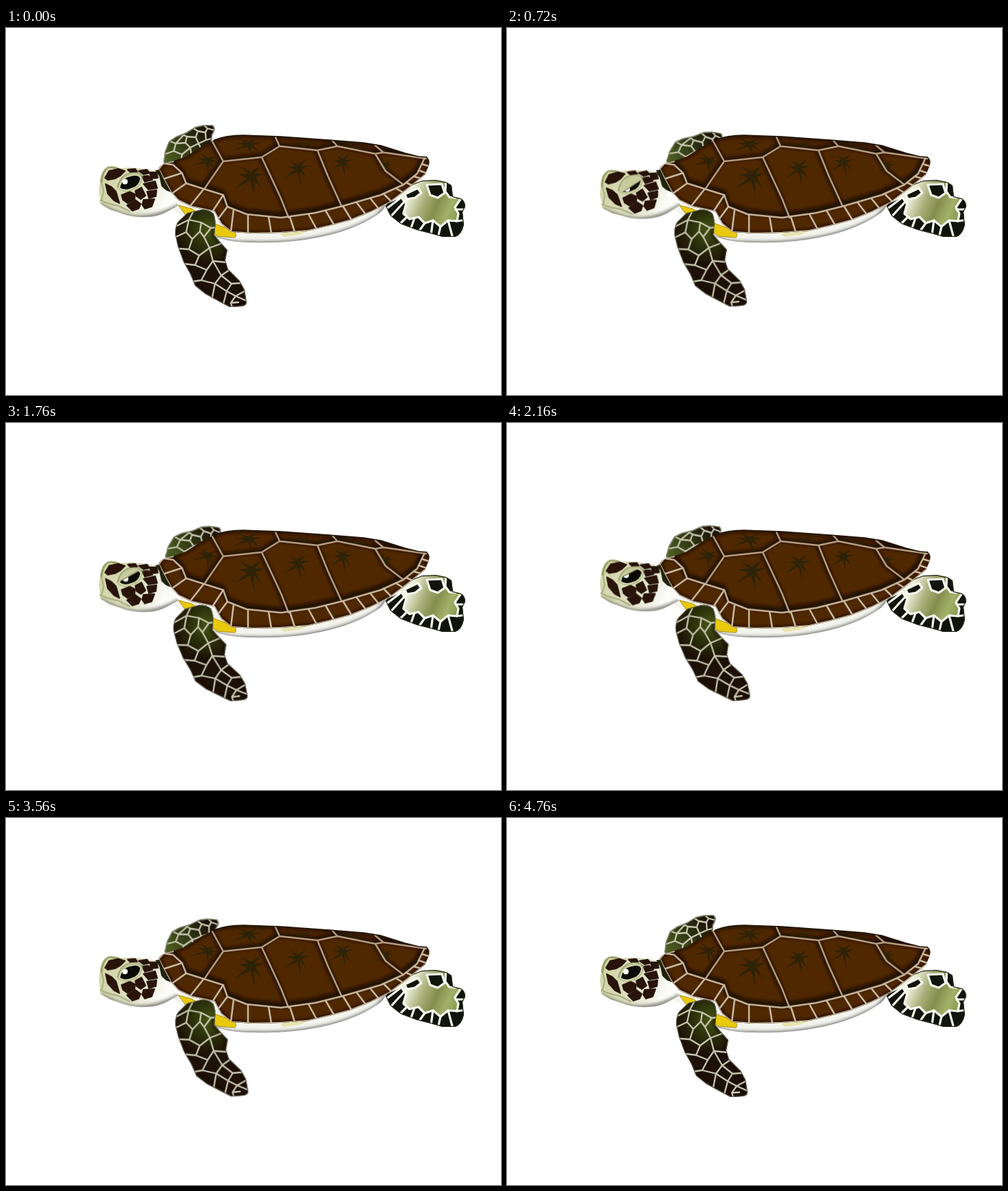
Recreate the animation shown at these times as an HTML page. Size 720x534 px, loop 4.8 s.

```html
<!DOCTYPE html>
<html lang="en">
<head>
<meta charset="utf-8">
<title>Swimming turtle</title>
<style>
html, body { margin: 0; width: 100%; height: 100%; overflow: hidden; background: #fff; }
svg { display: block; width: 720px; height: 534px; }
path { stroke-linejoin: round; stroke-linecap: round; }
.net { fill: none; stroke: #c6c5ae; stroke-width: 2.3; }
.seam { fill: none; stroke: #b59c7f; stroke-width: 2.5; }
.shade { fill: none; stroke: #1c0d00; }
.move { animation: 4800ms linear infinite; }
#head { transform-origin: 238px 235px; animation-name: nod; }
#lid { animation-name: blink; }
#glint { animation-name: glint; }
#arm { transform-origin: 285px 272px; animation-name: paddle; }
#far { transform-origin: 236px 192px; animation-name: wave; }
@keyframes nod {
  0%, 100% { transform: rotate(0); }
  7% { transform: rotate(-1.6deg); }
  15% { transform: rotate(-3.6deg); }
  20% { transform: rotate(-3.5deg); }
  28.3% { transform: rotate(-2.4deg); }
  38% { transform: rotate(.6deg); }
  45% { transform: rotate(1.7deg); }
  51% { transform: rotate(1.6deg); }
  61.7% { transform: rotate(.4deg); }
  80%, 94% { transform: rotate(0); }
}
@keyframes blink {
  0%, 84%, 100% { transform: translate(-4px, -7.2px); }
  15%, 20% { transform: translate(2px, 3.6px); }
  28.3% { transform: translate(1.4px, 2.5px); }
  45% { transform: translate(-1.6px, -3px); }
  61.7% { transform: translate(-3px, -5.4px); }
}
@keyframes glint {
  0%, 45%, 100% { transform: translate(0, 0); }
  15%, 28.3% { transform: translate(2px, 7px); }
}
@keyframes paddle {
  0%, 100% { transform: translate(0, 0) rotate(0); }
  15% { transform: translate(-3px, 0) rotate(-.9deg); }
  28.3% { transform: translate(-5.5px, .3px) rotate(-1.2deg); }
  35% { transform: translate(-4px, .6px) rotate(-2.3deg); }
  45% { transform: translate(-2px, .6px) rotate(-2.6deg); }
  61.7% { transform: translate(-1px, .4px) rotate(-2.2deg); }
  85.8% { transform: translate(0, 0) rotate(-.5deg); }
  94% { transform: rotate(0); }
}
@keyframes wave {
  0%, 94%, 100% { transform: translate(0, 0) rotate(0); }
  11.7% { transform: translate(2px, 0) rotate(6deg); }
  15%, 28.3% { transform: translate(3px, 0) rotate(10deg); }
  45%, 52% { transform: translate(2.4px, 0) rotate(8deg); }
  61.7% { transform: translate(3px, 0) rotate(10deg); }
  70% { transform: translate(2.2px, 0) rotate(7deg); }
  81% { transform: translate(1px, 0) rotate(3deg); }
  85.8% { transform: translate(.6px, 0) rotate(2deg); }
}
</style>
</head>
<body>
<svg viewBox="0 0 720 534">
<defs>
  <filter id="b1" x="-20%" y="-20%" width="140%" height="140%"><feGaussianBlur stdDeviation=".6"/></filter>
  <filter id="b3" x="-20%" y="-20%" width="140%" height="140%"><feGaussianBlur stdDeviation="2.6"/></filter>
  <radialGradient id="armFill" gradientUnits="userSpaceOnUse" cx="296" cy="294" r="50">
    <stop offset="0" stop-color="#475513"/><stop offset=".5" stop-color="#2b310b"/><stop offset="1" stop-color="#1d1006"/>
  </radialGradient>
  <linearGradient id="farFill" gradientUnits="userSpaceOnUse" x1="235" y1="192" x2="292" y2="146">
    <stop offset="0" stop-color="#4d5c22"/><stop offset=".5" stop-color="#2e3513"/><stop offset="1" stop-color="#1b1007"/>
  </linearGradient>
  <linearGradient id="finFill" gradientUnits="userSpaceOnUse" x1="590" y1="236" x2="660" y2="266">
    <stop offset="0" stop-color="#eef0dc"/><stop offset=".3" stop-color="#a9b07a"/><stop offset=".55" stop-color="#848e4c"/>
    <stop offset=".8" stop-color="#a3b069"/><stop offset="1" stop-color="#8c9a52"/>
  </linearGradient>
  <linearGradient id="faceFill" gradientUnits="userSpaceOnUse" x1="150" y1="222" x2="225" y2="262">
    <stop offset="0" stop-color="#d3d6ab"/><stop offset=".55" stop-color="#dddfc4"/><stop offset="1" stop-color="#fbfbf8"/>
  </linearGradient>

  <path id="star" d="M14-12L4 0 21-1 6 5 15 22 3 9 5 34-2 10-25 22-6 6-20 1-5 0-16-11-1-3Z"/>
  <path id="shell" d="M222 204Q226 197 245 193L262 187 285 172 303 163Q320 156 345 156L400 158 470 163 520 167 545 171 580 182 600 187 612 188Q617 191 615 200L609 214 587 232 558 254 530 268 500 280 470 288 440 295 400 298 360 299 328 297 313 285 303 267 270 260 251 251 240 239 229 219Z"/>
  <path id="seams" d="M300 165L316 194 372 188 398 172 392 159M398 172L453 178 482 172 474 163M482 172L537 183 549 181 537 171M549 181L611 190M372 188L400 248 411 276M453 178L468 215 488 259M537 183L552 208 578 228M316 194L296 223 288 235"/>
  <path id="rim" d="M229 197L243 199 256 211 262 226 300 238 316 243 322 260 350 271 400 276 450 269 490 259 545 243 578 228 598 212 609 189"/>
  <path id="belly" d="M240 262L260 250 325 286 440 291 552 253Q554 263 538 273 506 294 458 304 410 314 360 312 325 312 305 304L270 284Z"/>
  <path id="armShape" d="M285 264Q296 264 302 270 306 280 304 292L303 301 312 312 322 323 319 338 323 351 340 368 347 381 350 399Q350 404 343 405L325 406 310 398 290 387 275 375 268 358 258 340 250 318 246 300Q246 286 251 281L264 269Z"/>
  <path id="farShape" d="M229 196L231 180 237 165 247 158 262 152 275 144 288 141 300 141Q305 144 303 150L300 156 299 166 288 184 250 202Z"/>
  <path id="finShape" d="M552 259L565 244 585 230 605 222 625 221 640 224 648 229 650 245 662 248Q668 252 668 260L664 268 666 286Q663 301 653 304L635 304 618 299 598 294 574 285 559 273Z"/>
  <path id="headShape" d="M137 221Q138 207 148 202 157 200 165 204L182 203 205 205 218 208 223 216 226 230 240 243 251 258 237 266Q222 275 205 275 183 276 169 270L151 264 139 257Q135 254 137 249L135 236Z"/>
  <path id="eye" d="M165 233Q168 217 182 215 193 212 196 219 194 231 182 234 173 238 165 233Z"/>
  <clipPath id="shellClip"><use href="#shell"/></clipPath>
  <clipPath id="bellyClip"><use href="#belly"/></clipPath>
  <clipPath id="armClip"><use href="#armShape"/></clipPath>
  <clipPath id="farClip"><use href="#farShape"/></clipPath>
  <clipPath id="finClip"><use href="#finShape"/></clipPath>
  <clipPath id="headClip"><use href="#headShape"/></clipPath>
  <clipPath id="eyeClip"><use href="#eye"/></clipPath>
</defs>

<g id="far" class="move">
  <use href="#farShape" fill="url(#farFill)"/>
  <g clip-path="url(#farClip)">
    <path class="net" filter="url(#b1)" d="M230 184L244 179 256 184 254 198M244 179L247 168 236 164M247 168L261 167 268 174 256 184M261 167L263 158 253 153M263 158L276 159 280 168 268 174 270 186M276 159L279 150 271 145M279 150L290 152 291 163 280 168 286 180M290 152L293 146 304 149M293 146L286 140M291 163L302 160M247 168L258 156"/>
    <use href="#farShape" fill="none" stroke="#7b8069" stroke-width="3" filter="url(#b1)"/>
  </g>
</g>

<g id="fin">
  <use href="#finShape" fill="url(#finFill)"/>
  <g clip-path="url(#finClip)">
    <g fill="#11140a" stroke="#f7f8ee" stroke-width="3.2" filter="url(#b1)">
      <path d="M612 228L634 227 638 240 628 247 617 243Z"/>
      <path d="M640 221L654 228 654 247 645 246 639 238Z"/>
      <path d="M580 242L599 233 604 240 595 247 583 249Z"/>
      <path d="M545 259L574 245 582 256 578 270 587 278 600 275 609 284 621 280 632 289 643 280 656 281 658 270 653 261 661 249 676 246 674 312 600 308 545 278Z"/>
      <path d="M654 264L670 264M656 281L670 279M643 280L650 306M632 289L628 306M621 280L618 302M609 284L599 298M594 277L588 294M583 275L570 288M580 252L559 275M573 248L552 264" fill="none"/>
    </g>
    <use href="#finShape" fill="none" stroke="#23251a" stroke-width="2.4" filter="url(#b1)"/>
  </g>
</g>

<g id="body">
  <use href="#belly" fill="#f4f4ef"/>
  <g clip-path="url(#bellyClip)">
    <path d="M305 307Q325 315 360 314 410 316 458 306 506 296 540 275L556 258" fill="none" stroke="#6a6a68" stroke-width="7" filter="url(#b3)"/>
  </g>
  <path d="M251 258L270 263 304 285 331 295Q337 301 333 305L308 303 286 289 262 273Z" fill="#e9c90c" stroke="#a98f18" filter="url(#b1)"/>
  <path d="M398 299L441 295 426 301 404 304Z" fill="#e7e4af" filter="url(#b1)"/>
  <path d="M217 207L230 205 246 228 240 239 224 233Z" fill="#20230a"/>
</g>

<g id="head" class="move">
  <use href="#headShape" fill="url(#faceFill)"/>
  <g clip-path="url(#headClip)">
    <path d="M137 258Q158 270 181 275 215 279 251 259" fill="none" stroke="#6f7065" stroke-width="5" filter="url(#b3)"/>
    <path d="M136 250Q148 256 164 259L180 267M138 220L142 238 139 250" fill="none" stroke="#a9ad7d" stroke-width="2" filter="url(#b1)"/>
    <path d="M139 224Q140 207 150 202L163 204" fill="none" stroke="#98a065" stroke-width="3" filter="url(#b1)"/>
  </g>
  <g fill="#28140a" stroke="#28140a" stroke-width="1.8">
    <path d="M144 218L150 208 164 205 173 208 166 215 159 219 148 221Z"/>
    <path d="M145 227L153 231 160 238 165 255 157 251 148 241Z"/>
    <path d="M168 243L180 238 188 242 187 249 177 255 170 250Z"/>
    <path d="M176 258L188 250 196 256 193 263 184 266Z"/>
    <path d="M188 237L197 232 203 244 196 249 190 245Z"/>
    <path d="M200 227L217 223 220 233 207 235Z"/>
    <path d="M205 238L219 236 218 245 208 248Z"/>
    <path d="M200 250L216 249 212 260 202 263 198 257Z"/>
    <path d="M177 206L188 205 191 209 181 210Z"/>
    <path d="M193 208L205 206 209 211 200 213Z"/>
    <path d="M209 210L219 210 221 218 211 219Z"/>
    <path d="M198 216L207 215 213 221 202 224Z"/>
  </g>
  <use href="#eye" fill="#0b0b06" stroke="#b6bc87" stroke-width="5"/>
  <use href="#eye" fill="#0b0b06" stroke="#dfe2b9" stroke-width="1.5"/>
  <g clip-path="url(#eyeClip)">
    <circle id="glint" class="move" cx="173" cy="223.5" r="4" fill="#fff"/>
    <g id="lid" class="move">
      <path d="M150 207L187 186 205 209 162 233Z" fill="#c7cb9c"/>
      <path d="M162 233L205 209" stroke="#777b4c" stroke-width="1.2"/>
    </g>
  </g>
  <path d="M162 232Q166 214 181 211 194 208 199 217" fill="none" stroke="#858b59" stroke-width="1.2"/>
</g>

<g id="carapace">
  <use href="#shell" fill="#502800"/>
  <g clip-path="url(#shellClip)">
    <g class="shade" filter="url(#b3)">
      <use href="#seams" stroke-width="6" x="-2" y="-2"/>
      <use href="#rim" stroke-width="7" x="-1" y="-4"/>
      <use href="#shell" stroke-width="5"/>
    </g>
    <g fill="#2e2207" filter="url(#b1)">
      <use href="#star" transform="translate(357 212)"/>
      <use href="#star" transform="translate(425 201) scale(.82)"/>
      <use href="#star" transform="translate(490 192) scale(.73)"/>
      <use href="#star" transform="translate(552 198) scale(.62 .5)"/>
      <use href="#star" transform="translate(294 191) rotate(12) scale(.85 .62)"/>
      <use href="#star" transform="translate(353 167) scale(1 .58)"/>
      <use href="#star" transform="translate(432 168) scale(.85 .18)"/>
      <use href="#star" transform="translate(510 174) scale(.8 .2)"/>
    </g>
    <g class="seam" filter="url(#b1)">
      <use href="#seams"/>
      <use href="#rim" stroke="#c2b097"/>
      <path stroke="#c8b9a3" d="M256 211L231 219M262 226L241 241M287 235L268 259M316 243L301 266M322 260L310 276M331 265L327 297M352 272L352 299M382 275L386 299M413 275L420 297M440 271L452 293M465 266L478 288M490 259L503 280M510 254L524 272M530 248L543 264M549 241L562 254M567 233L580 241M582 225L593 230M593 216L604 219M600 207L611 211M605 198L615 201"/>
      <path stroke="#c8b9a3" d="M243 194L229 197 222 205 229 219 240 239 251 251 270 260 303 267 313 285 328 297 360 299 400 298 440 295 470 288 500 280 530 268 558 254 587 232 609 214"/>
    </g>
  </g>
  <path d="M303 163Q320 156 345 156L400 158 470 163 520 167 545 171 580 182 600 187 612 188" fill="none" stroke="#211306" stroke-width="1.4" filter="url(#b1)"/>
</g>

<g id="arm" class="move">
  <use href="#armShape" fill="url(#armFill)"/>
  <g clip-path="url(#armClip)">
    <path class="shade" filter="url(#b3)" stroke-width="5" d="M304 292L303 301 322 323 319 338 347 381 350 404 325 406 275 375"/>
    <path class="net" filter="url(#b1)" d="M248 288L266 279 284 283 298 291 306 290M266 279L273 266M284 283L282 296 271 307 262 297 266 279M262 297L247 304M298 291L288 304 282 296M288 304L296 320 281 331 266 322 271 307M266 322L252 321M296 320L312 314M281 331L275 345 259 343M275 345L292 352 301 339 296 320M301 339L320 341M292 352L284 367 271 369"/>
    <path class="net" filter="url(#b1)" d="M284 367L304 372 313 360 301 339M313 360L325 352M304 372L300 392M304 372L321 383 328 372 313 360M328 372L343 371M321 383L316 402M321 383L334 390 347 383M334 390L327 400 329 406M334 390L350 397M327 400L338 399"/>
    <use href="#armShape" fill="none" stroke="#595a4b" stroke-width="2" filter="url(#b1)"/>
  </g>
</g>
</svg>
</body>
</html>
```
